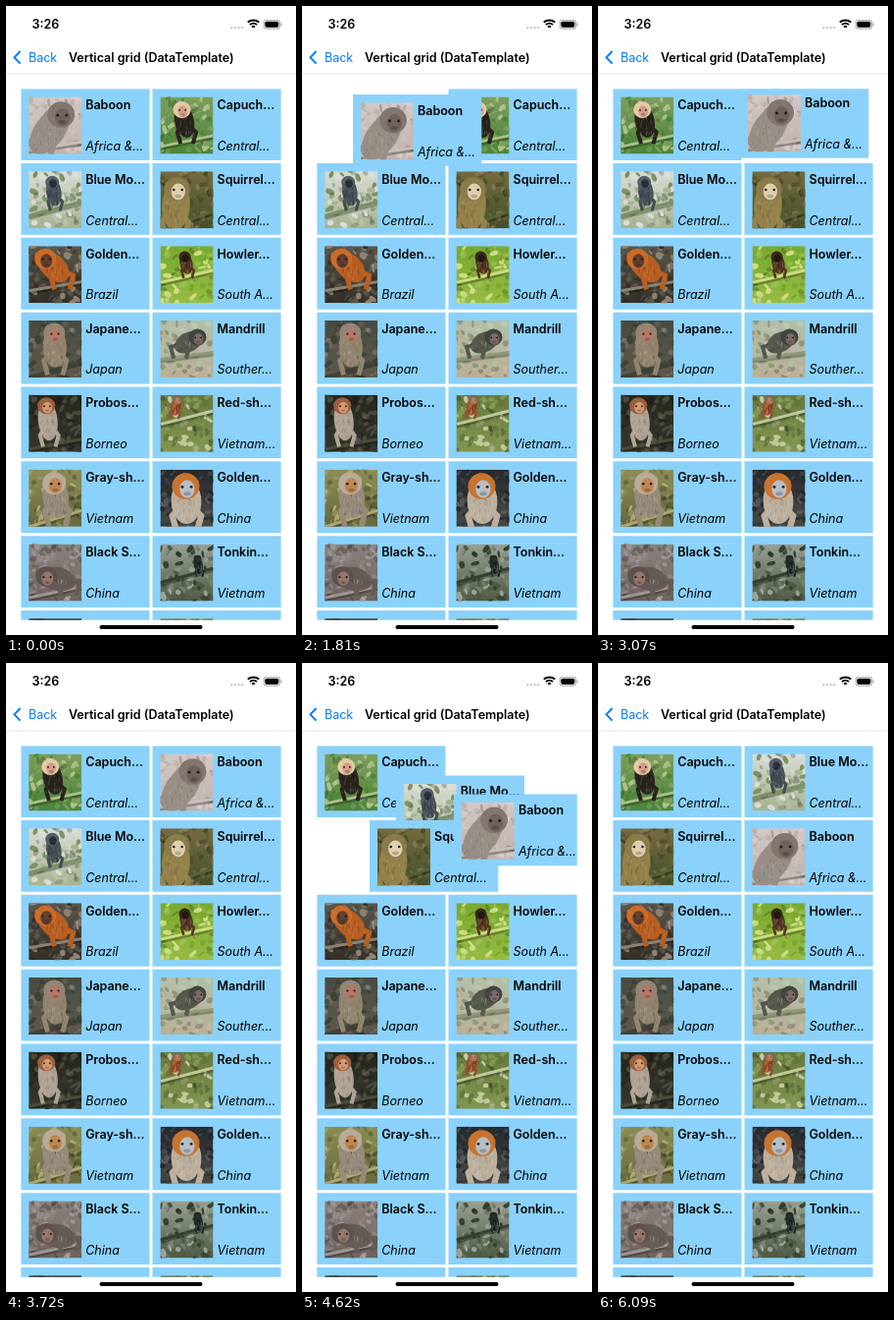
Write an HTML page with a canvas that moves like this. It is 296 px wide and 640 px high and loops after 6200 ms.

```html
<!DOCTYPE html>
<html lang="en">
<meta charset="utf-8">
<title>Vertical grid</title>
<style>
html, body { margin: 0; width: 100%; height: 100%; overflow: hidden; background: #fff }
canvas { display: block }
</style>
<canvas id="stage" width="296" height="640"></canvas>
<script>
const g = document.getElementById('stage').getContext('2d');
const LOOP = 6200, STEP = 120, PIC_W = 54, PIC_H = 58;
const GRID = { x: 15.2, y: 84.2, w: 265.6, h: 540.6 };
const CARD = { w: 131.3, h: 72.8, dx: 134.3, dy: 75.83 };

let seed = 1;
const rnd = (from = 0, to = 1) =>
  from + (to - from) * (seed = seed * 16807 % 2147483647) / 2147483647;
const mix = (a, b, k) => a.map((v, i) => v + (b[i] - v) * k);
const smooth = (t, from, to) => {
  const k = Math.min(1, Math.max(0, (t - from) / (to - from)));
  return k * k * (3 - 2 * k);
};

function rect(color, x, y, w, h, r = 0) {
  g.fillStyle = color;
  g.beginPath();
  g.roundRect(x, y, w, h, r);
  g.fill();
}
function oval(color, x, y, rx, ry = rx, turn = 0) {
  g.fillStyle = color;
  g.beginPath();
  g.ellipse(x, y, rx, ry, turn, 0, 7);
  g.fill();
}
function line(color, width, ...points) {
  g.strokeStyle = color;
  g.lineWidth = width;
  g.beginPath();
  points.forEach(p => g.lineTo(...p));
  g.stroke();
}
function text(str, x, y, style = '600', color = '#000') {
  g.font = style + ' 12.5px Inter, sans-serif';
  g.fillStyle = color;
  g.fillText(str, x, y);
}

// name, home, colours (sky, ground, leaf, body, head, face), head, hip, head radius
const cards = [
  ['Baboon', 'Africa &...', '#d2c8c5 #bdb1ac #c8bdb8 #978e86 #81776f #6f615c', [33, 18], [10, 50], 14],
  ['Capuch...', 'Central...', '#7d9e5c #4d8439 #a9c188 #29231d #e2caa4 #d29e88', [22, 13], [27, 36], 9],
  ['Blue Mo...', 'Central...', '#d7dcd4 #a6b38f #7d9266 #444d55 #545f68 #2b3137', [24, 11], [27, 31], 7],
  ['Squirrel...', 'Central...', '#766a40 #44502a #5b6030 #94814a #8a7b4a #e0cfae', [17, 18], [15, 52], 13],
  ['Golden...', 'Brazil', '#5a564c #343027 #8b8271 #b95e20 #cc6c28 #60402e', [17, 13], [34, 30], 11],
  ['Howler...', 'South A...', '#78a92f #96bb42 #cddc80 #54341f #3a261b #241a14', [25, 11], [28, 25], 6],
  ['Japane...', 'Japan', '#484b42 #5e584c #3c4235 #91856f #928673 #b47867', [26, 13], [27, 41], 11],
  ['Mandrill', 'Souther...', '#b3bfa8 #b9b096 #8d9b75 #55584c #42453d #7e6a6c', [38, 17], [20, 27], 9],
  ['Probos...', 'Borneo', '#24261f #37372c #484b37 #b0a394 #9a5f3e #d39a74', [18, 11], [21, 41], 9],
  ['Red-sh...', 'Vietnam...', '#66783d #829650 #c0c898 #9a4d28 #756c64 #cc8054', [17, 5], [15, 18], 5],
  ['Gray-sh...', 'Vietnam', '#8a8c55 #686a3f #b0a872 #978a7a #b8ab99 #bf8751', [26, 14], [29, 42], 12],
  ['Golden...', 'China', '#25292e #484844 #3d4244 #bdb09e #c8742f #b4bec4', [26, 17], [27, 47], 14],
  ['Black S...', 'China', '#8a827e #6d625e #9c9490 #655b56 #5b524e #94766b', [18, 33], [41, 38], 11],
  ['Tonkin...', 'Vietnam', '#98a094 #4e5a42 #33402c #1b231e #202622 #2c332d', [38, 15], [40, 28], 4]
];

function photo([, , colors, head, hip, r]) {
  const [sky, ground, leaf, body, fur, face] = colors.split(' ');
  const [x, y] = head, [hx, hy] = hip;
  const fade = g.createLinearGradient(0, 0, 0, PIC_H);
  fade.addColorStop(0, sky);
  fade.addColorStop(1, ground);
  rect(fade, 0, 0, PIC_W, PIC_H);
  const shades = [leaf, ground, sky, '#0003', '#fff2'];
  for (let i = 0; i < 70; i++)
    oval(shades[i % 5], rnd(0, PIC_W), rnd(0, PIC_H), rnd(2, 5), rnd(1, 3), rnd(0, 3));

  // A branch under the hip, then body, limbs and head
  const seat = Math.min(hy + r, 50), tilt = rnd(3, 9);
  line('#0004', 4, [0, seat + tilt + 2], [PIC_W, seat - tilt + 2]);
  line(leaf, 3, [0, seat + tilt], [PIC_W, seat - tilt]);
  const length = Math.hypot(hx - x, hy - y) / 2 + r * .6, turn = Math.atan2(hy - y, hx - x);
  oval(body, (x + hx) / 2, (y + hy) / 2, length, r * 1.1, turn);
  for (const side of [-.7, .7])
    line(body, r * .45, mix(head, hip, .5), [hx + side * r * 1.5, hy], [hx + side * r, hy + r * 1.3]);
  for (let i = 0; i < 30; i++) {
    const [fx, fy] = mix(head, hip, rnd(.2, 1.1)), dx = rnd(-r, r) * .8;
    line(i % 2 ? '#fff2' : '#0002', 1, [fx + dx, fy], [fx + dx * 1.1, fy + 4]);
  }
  oval(fur, x, y, r, r * .95);
  oval(face, x + r * .1, y + r * .2, r * .55, r * .65);
  for (const side of [-.25, .4]) oval('#211a16', x + side * r, y + r * .05, r * .1);
  oval('#0003', x + r * .1, y + r * .55, r * .25, r * .15);
}

function drawCard(i, [x, y]) {
  const card = cards[i] || cards[i - 6];
  rect('#8ad2fb', x, y, CARD.w, CARD.h);
  g.save();
  g.translate(x + 8, y + 8.3);
  g.beginPath();
  g.rect(0, 0, PIC_W, PIC_H);
  g.clip();
  seed = 97 + i * 7919;
  photo(card);
  g.restore();
  text(card[0], x + 66, y + 20.9);
  text(card[1], x + 66, y + 62.6, 'italic 400');
}

// Screen refreshes come in bursts: start time and number of steps.
const bursts = [[0, 1], [1200, 5], [1810, 1], [2160, 3], [2640, 1], [2880, 1], [3070, 3],
  [3720, 1], [4000, 4], [4620, 1], [4800, 4], [5850, 3]];
function refresh(t) {
  const [start, count] = bursts.findLast(b => b[0] <= t);
  return start + STEP * Math.min(count - 1, Math.floor((t - start) / STEP));
}

// Path of the dragged card: time and position.
const drag = [[1620, 15.2, 84.2], [1810, 52, 90], [2400, 149, 83], [3070, 145, 82], [3720, 149.5, 84.2],
  [4120, 150.5, 97.2], [4620, 155, 133.5], [4920, 156, 155], [5850, 152, 161], [6090, 149.5, 160]];
function dragAt(t) {
  const i = Math.max(0, drag.findLastIndex(p => p[0] <= t));
  const a = drag[i], b = drag[i + 1] || a;
  return mix(a, b, a === b ? 0 : smooth(t, a[0], b[0])).slice(1);
}

const slot = i => [GRID.x + i % 2 * CARD.dx, GRID.y + (i >> 1) * CARD.dy];
// The first three neighbours slide back one slot to make room.
function place(i, t) {
  const start = i === 1 ? 2100 : 4450;
  return i > 3 ? slot(i) : mix(slot(i), slot(i - 1), smooth(t, start, start + 300));
}

function drawBars() {
  text('3:26', 26.5, 22.8);
  for (let i = 0; i < 4; i++) oval('#bbb', 230.3 + i * 3.6, 22, 1.1);
  for (const r of [2, 5.3, 8.6]) {
    g.strokeStyle = '#000';
    g.lineWidth = 2;
    g.beginPath();
    g.arc(252.5, 23, r, -2.3, -.84);
    g.stroke();
  }
  rect('#999', 262.6, 14, 17.4, 9.4, 2.8);
  rect('#fff', 263.4, 14.8, 15.8, 7.8, 2.2);
  rect('#000', 264.3, 15.7, 14, 6, 1.6);
  rect('#999', 280.5, 17.2, 1.1, 3, .5);
  line('#007aff', 1.9, [14.5, 46], [8.5, 52.3], [14.5, 58.6]);
  text('Back', 23, 56.7, '400', '#007aff');
  text('Vertical grid (DataTemplate)', 64, 56.7);
  rect('#e6e6e6', 0, 68.6, 296, .8);
  rect('#000', 95.5, 630, 105, 3.9, 2);
}

function draw(now) {
  const t = refresh(now % LOOP);
  rect('#fff', 0, 0, 296, 640);
  drawBars();
  g.save();
  g.beginPath();
  g.rect(GRID.x, GRID.y, GRID.w, GRID.h);
  g.clip();
  for (let i = 1; i < 16; i++) drawCard(i, place(i, t));
  drawCard(0, dragAt(t));
  g.restore();
}

const start = performance.now();
function frame() {
  draw(performance.now() - start);
  requestAnimationFrame(frame);
}
frame();
</script>
</html>
```
